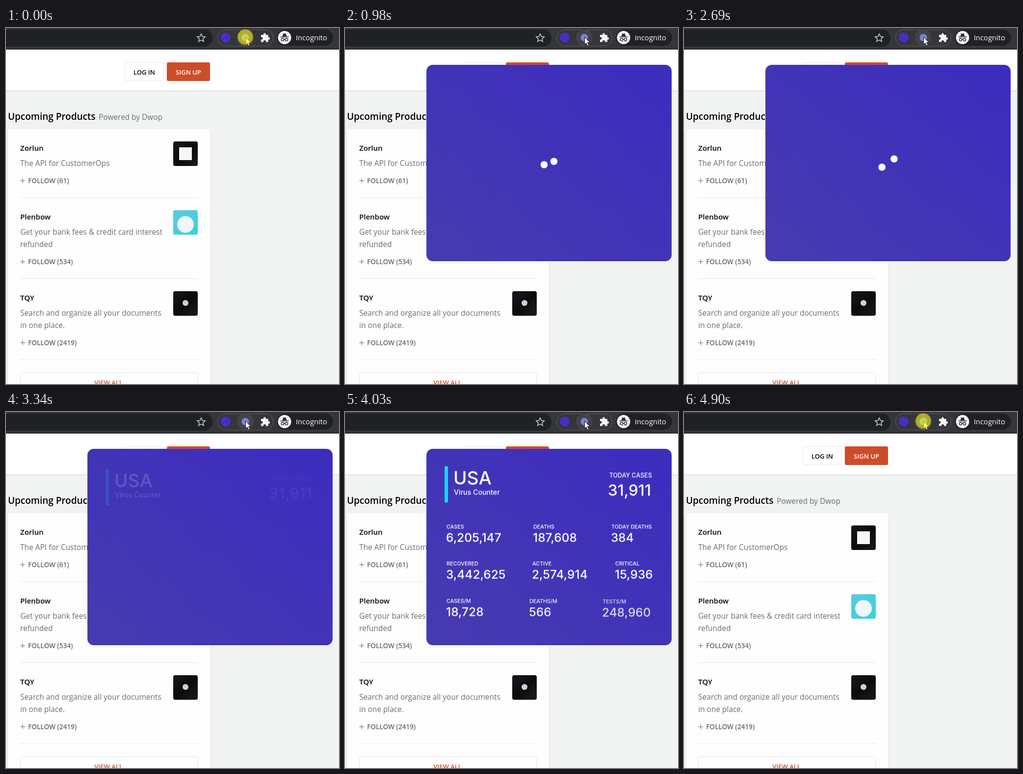
Write an HTML page that moves like this. It is 679x725 px and loops after 4.95 s.

```html
<!DOCTYPE html>
<html lang="en">
<head>
<meta charset="utf-8">
<title>Tracker popup</title>
<style>
html, body { margin: 0; width: 100%; height: 100%; overflow: hidden; background: #f1f3f3; }
svg { display: block; width: 679px; height: 725px; font-family: "Open Sans", "Noto Sans", sans-serif; }
.title { font-size: 18.95px; font-weight: 600; }
.name { font-size: 15px; font-weight: 600; fill: #050505; }
.desc { font-size: 15.43px; fill: #6b6e6e; }
.follow, .button { font-size: 13px; font-weight: 600; fill: #686868; }
.follow { font-size: 13.6px; }
.rule { stroke: #e4e5e5; fill: none; }

#popup, #loader, #loader circle, .item, #press, #tool, #hover { animation: 4950ms linear infinite both; }
#popup { font-family: Inter, Roboto, sans-serif; fill: #fff; font-weight: 500; animation-name: popup; }
@keyframes popup {
  0%, 4.04% { opacity: 0; transform: translateY(-28px); animation-timing-function: cubic-bezier(.215,.61,.355,1); }
  10.1%, 92.72% { opacity: 1; transform: none; }
  92.73%, 100% { opacity: 0; transform: none; }
}
#loader { animation-name: loader; }
@keyframes loader {
  0%, 61.61% { opacity: 1; }
  61.62%, 100% { opacity: 0; }
}
/* Two dots part and meet along a slowly tilting line. */
#loader circle { --side: 1; animation-name: part; animation-timing-function: ease-in-out; }
#loader circle + circle { --side: -1; }
@keyframes part {
  0%, 6.46%, 16.97%, 27.07%, 37.17%, 45.05%, 48.69%, 59.19%, 100% { transform: translate(0, 0); }
  11.72%, 22.02%, 32.12% { transform: translate(calc(var(--side) * 16.5px), calc(var(--side) * -5.5px)); }
  41.11%, 53.94% { transform: translate(calc(var(--side) * 12.5px), calc(var(--side) * -8.5px)); }
}
.item { animation-name: rise; animation-delay: calc(var(--i) * 50ms); }
@keyframes rise {
  0%, 65% { opacity: 0; transform: translateY(6.5px); animation-timing-function: cubic-bezier(.37,0,.63,1); }
  74%, 92.99% { opacity: 1; transform: none; }
  93%, 100% { opacity: 0; transform: translateY(6.5px); }
}
#press { fill: rgba(255,235,0,.58); animation-name: press; }
@keyframes press {
  0%, 1.02% { opacity: 1; }
  3%, 98.97% { opacity: 0; }
  98.98%, 100% { opacity: 1; }
}
#tool { animation-name: tool; animation-timing-function: step-end; }
@keyframes tool {
  0%, 87% { fill: #5cc6dd; }
  11.5% { fill: #7487d6; }
}
#hover { animation-name: hover; animation-timing-function: step-end; }
@keyframes hover {
  0%, 87% { fill: #4e545f; }
  11.5% { fill: #424349; }
}
</style>
</head>
<body>
<svg viewBox="0 0 679 725">
  <defs>
    <linearGradient id="violet" x1="0" y1="1" x2="1" y2="0">
      <stop offset="0" stop-color="#473bb0"/>
      <stop offset="1" stop-color="#3c2cbf"/>
    </linearGradient>
    <linearGradient id="teal" x1="0" y1="0" x2="1" y2="1">
      <stop offset="0" stop-color="#5fc9e2"/>
      <stop offset="1" stop-color="#37d3d8"/>
    </linearGradient>
    <linearGradient id="night" x1="0" y1="0" x2="1" y2="1">
      <stop offset="0" stop-color="#1b181c"/>
      <stop offset=".5" stop-color="#0b0b0e"/>
      <stop offset="1" stop-color="#201a1c"/>
    </linearGradient>
    <filter id="soft" x="-5%" y="-5%" width="110%" height="110%">
      <feDropShadow dx="0" dy="1" stdDeviation="1.2" flood-opacity=".12"/>
    </filter>
  </defs>

  <!-- Page -->
  <rect width="679" height="725" fill="#f1f3f3"/>
  <rect y="43" width="679" height="84" fill="#fff" filter="url(#soft)"/>
  <rect x="242.5" y="70.5" width="79" height="37" rx="3" fill="#fff" stroke="#e5e7e7"/>
  <rect x="328" y="70" width="88" height="38" rx="3" fill="#cc4d29"/>
  <g class="button" text-anchor="middle">
    <text x="282" y="95" style="fill:#050505">LOG IN</text>
    <text x="372" y="95" style="fill:#fff">SIGN UP</text>
  </g>
  <text x="4" y="187" class="title">Upcoming Products</text>
  <text x="189" y="187" class="desc">Powered by Dwop</text>
  <rect x="4" y="206" width="412" height="540" rx="5" fill="#fefefe" filter="url(#soft)"/>
  <g id="products"></g>
  <g>
    <rect x="341" y="231" width="50" height="50" rx="4" fill="url(#night)"/>
    <rect x="353" y="243" width="26" height="26" fill="#f6f6f6"/>
    <rect x="341" y="371" width="50" height="50" rx="4" fill="url(#teal)"/>
    <circle cx="366" cy="400" r="17" fill="#eef7fb"/>
    <rect x="341" y="536" width="50" height="50" rx="4" fill="url(#night)"/>
    <circle cx="366" cy="560" r="6" fill="#d0d0d2"/>
  </g>
  <rect x="29.5" y="701.5" width="361" height="40" rx="3" class="rule"/>
  <text x="209" y="727" text-anchor="middle" class="button" style="fill:#c4502f">VIEW ALL</text>

  <!-- Popup -->
  <g id="popup">
    <rect x="166" y="75" width="500" height="400" rx="13" fill="url(#violet)"/>
    <g id="loader">
      <circle cx="416" cy="275" r="7.3"/>
      <circle cx="416" cy="275" r="7.3"/>
    </g>
    <g class="item" style="--i:0">
      <rect x="203" y="110" width="7" height="75" rx="3" fill="#1fd3fb"/>
      <text x="221" y="147" font-size="37.3">USA</text>
      <text x="222" y="168.5" font-size="14.2">Virus Counter</text>
    </g>
    <g class="item" style="--i:1" text-anchor="end">
      <text x="626" y="133" font-size="12.5">TODAY CASES</text>
      <text x="624" y="170" font-size="31.5">31,911</text>
    </g>
    <g id="stats"></g>
  </g>

  <!-- Browser bar -->
  <rect width="679" height="42" fill="#35363a"/>
  <rect y="42" width="679" height="2" fill="#2a2b2e"/>
  <rect x="-30" y="3" width="451" height="35" rx="17.5" fill="#202124"/>
  <path d="M398 12l2.4 5.3 5.8.6-4.3 3.9 1.2 5.7-5.1-2.9-5.1 2.9 1.2-5.7-4.3-3.9 5.8-.6z" fill="none" stroke="#c4c7ca" stroke-width="1.6"/>
  <rect x="431.5" y="3.5" width="113" height="33" rx="16.5" fill="none" stroke="#5b5d62"/>
  <circle cx="448" cy="19.5" r="10" fill="#4b2cc6"/>
  <circle id="hover" cx="488" cy="19.5" r="17"/>
  <circle id="tool" cx="488" cy="19.5" r="7.5"/>
  <path d="M520 14h5v-1a2.4 2.4 0 0 1 4.8 0v1h5v5h1a2.4 2.4 0 0 1 0 4.8h-1v4.7h-4.7v-1a2.6 2.6 0 0 0-5.2 0v1h-4.9v-4.9h1a2.5 2.5 0 0 0 0-5h-1z" fill="#f4f5f6"/>
  <rect x="552" y="3" width="115" height="33" rx="16.5" fill="#202124"/>
  <circle cx="568" cy="19.5" r="13.5" fill="#f3f4f5"/>
  <path d="M563.5 17l1.6-5.2q.4-1 1.4-.6l1.5.5 1.5-.5q1-.4 1.4.6l1.6 5.2z" fill="#2c2d30"/>
  <g fill="none" stroke="#2c2d30" stroke-width="1.4">
    <path d="M559.5 18.3h17M566.8 23.2q1.2-.8 2.4 0"/>
    <circle cx="564" cy="23.7" r="2.7"/>
    <circle cx="572" cy="23.7" r="2.7"/>
  </g>
  <text x="591" y="25" font-size="14.7" fill="#fff">Incognito</text>
  <path d="M488.5 18.5v15.2l3.4-3.2 2.5 5.8 2.7-1.2-2.5-5.6h4.6z" fill="#fff" stroke="#111" stroke-width="1"/>
  <circle id="press" cx="488" cy="18.3" r="15.5"/>
</svg>
<script>
const products = [
  { y: 250, name: "Zorlun", lines: ["The API for CustomerOps"], follows: 61 },
  { y: 390, name: "Plenbow", lines: ["Get your bank fees & credit card interest", "refunded"], follows: 534 },
  { y: 555, name: "TQY", lines: ["Search and organize all your documents", "in one place."], follows: 2419 }
];
const stats = [
  [[207, "CASES", "6,205,147"], [384, "DEATHS", "187,608"], [543, "TODAY DEATHS", "384"]],
  [[207, "RECOVERED", "3,442,625"], [382, "ACTIVE", "2,574,914"], [551, "CRITICAL", "15,936"]],
  [[207, "CASES/M", "18,728"], [376, "DEATHS/M", "566"], [525, "TESTS/M", "248,960"]]
];
const text = (x, y, attrs, content) =>
  `<text x="${x}" y="${y}" ${attrs}>${content.replace("&", "&amp;")}</text>`;

document.getElementById("products").innerHTML = products.map(({ y, name, lines, follows }) => {
  const last = y + 6 + 25 * lines.length;
  return text(29, y, 'class="name"', name)
    + lines.map((line, i) => text(29, y + 31 + 25 * i, 'class="desc"', line)).join("")
    + `<path d="M29 ${last + 30}h10m-5-5v10" stroke="#666" fill="none"/>`
    + text(45, last + 35, 'class="follow"', `FOLLOW (${follows})`)
    + `<path d="M29 ${last + 64.5}h362" class="rule"/>`;
}).join("");

document.getElementById("stats").innerHTML = stats.map((row, r) =>
  row.map(([x, label, value], c) => {
    const y = 237 + 75.5 * r;
    return `<g class="item" style="--i:${2 + 3 * r + c}">`
      + text(x, y, 'font-size="10.8"', label)
      + text(x - 1, y + 27.3, 'font-size="24.5"', value)
      + "</g>";
  }).join("")).join("");
</script>
</body>
</html>
```
